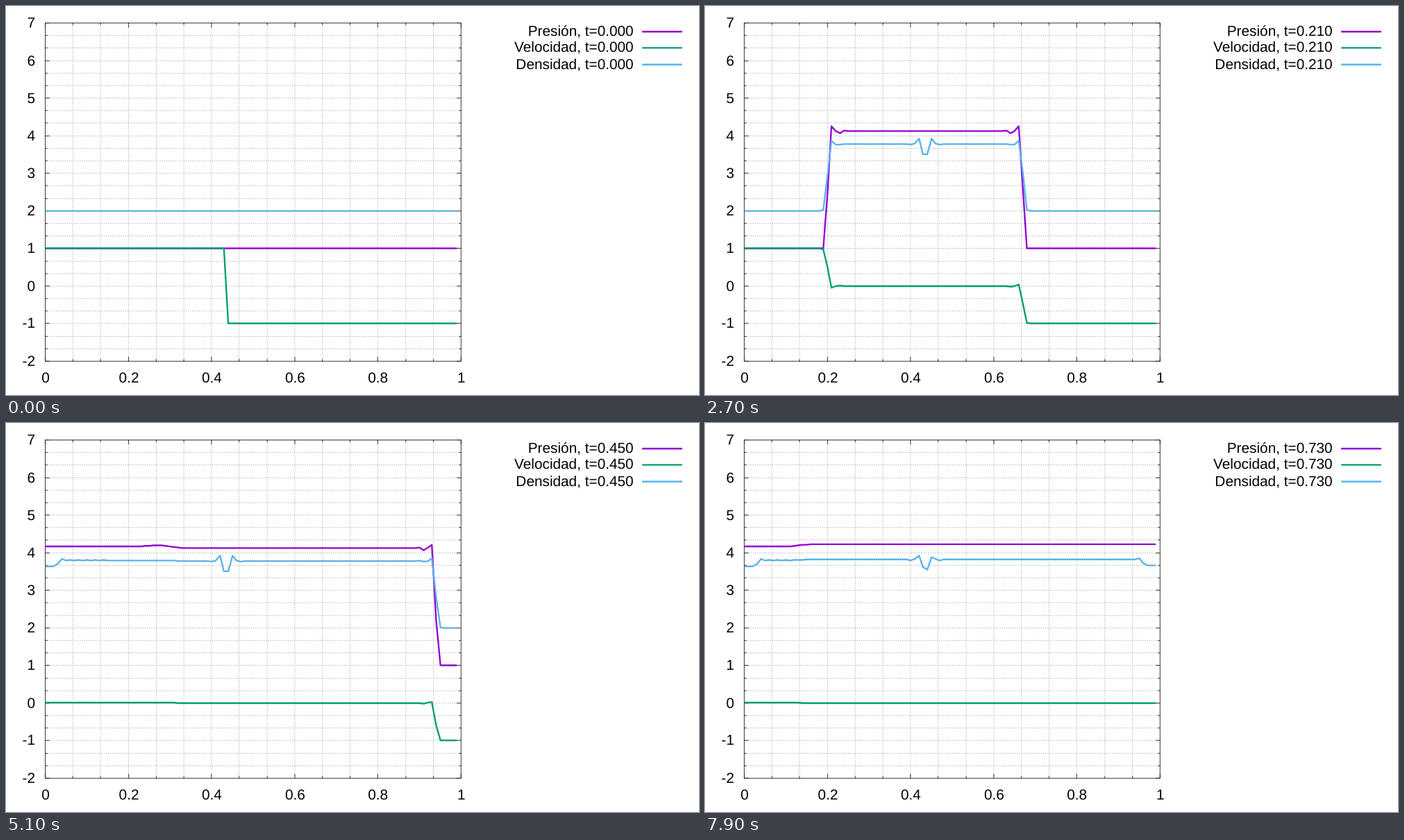
Animation of 998 by 561 pixels, one loop 8000 ms. Source, as an HTML page:

```html
<!DOCTYPE html>
<html lang="es">
<head>
<meta charset="utf-8">
<style>
  html, body { margin: 0; width: 100%; height: 100%; overflow: hidden; background: #fff; }
  svg { display: block; width: 998px; height: 561px; }
  text { font: 26.67px "Liberation Sans", Arial, sans-serif; fill: #000; text-rendering: geometricPrecision; }
  path { fill: none; }
  .grid { stroke: #888; stroke-dasharray: 1.5 2.5; }
  .axes { stroke: #000; }
  .line { stroke-width: 3; stroke-linejoin: round; }
  .end { text-anchor: end; }
  .mid { text-anchor: middle; }
</style>
</head>
<body>
<svg id="plot" viewBox="0 0 1280 720" preserveAspectRatio="none"></svg>
<script>
// Drawn on a 1280 x 720 canvas with points snapped to its pixel centres
const plot = document.getElementById('plot');
const snap = v => Math.floor(v + 1e-6) + 0.5;
const X = x => snap(72.5 + 768 * x);
const Y = y => snap(518.39 - 69.556 * y);
const clamp = v => Math.max(0, Math.min(1, v));

function add(tag, attrs, text = '') {
  const el = document.createElementNS('http://www.w3.org/2000/svg', tag);
  for (const k in attrs) el.setAttribute(k, attrs[k]);
  el.textContent = text;
  return plot.appendChild(el);
}

// Grid, ticks and tick labels
const [L, R, T, B] = [X(0), X(1), Y(7), Y(-2)];
let grid = '', axes = `M${L} ${T}H${R}V${B}H${L}Z`;
for (let i = 0; i <= 15; i++) {
  const x = X(i / 15), len = i % 3 ? 4 : 8;
  if (i % 15) grid += `M${x} ${B}V${T}`;
  axes += `M${x} ${B}v${-len}M${x} ${T}v${len}`;
  if (i % 3 === 0) add('text', { x: x + 0.6, y: 697, class: 'mid' }, String(i / 15));
}
for (let i = 0; i <= 27; i++) {
  const y = Y(i / 3 - 2), len = i % 3 ? 4 : 8;
  if (i % 27) grid += `M${L} ${y}H${R}`;
  axes += `M${L} ${y}h${len}M${R} ${y}h${-len}`;
  if (i % 3 === 0) add('text', { x: 53.9, y: y + 8.6, class: 'end' }, String(i / 3 - 2));
}
add('path', { d: grid, class: 'grid' });
add('path', { d: axes, class: 'axes' });

const series = [['Presión', '#9400d3'], ['Velocidad', '#009e73'], ['Densidad', '#56b4e9']].map(([name, stroke], i) => {
  const y = snap(47.2 + 30.5 * i);
  add('path', { d: `M1175 ${y}H1249`, stroke, class: 'line' });
  return {
    name,
    label: add('text', { x: 1159, y: y + 7.8, class: 'end' }),
    curve: add('path', { stroke, class: 'line' })
  };
});

// Shock profile, by cells behind the front
const KNOTS = [-1.3, -.9, -.3, 0, .15, .7, 1.1, 1.7, 2.1, 2.7, 3.1, 3.7, 4.2, 5.2];
const PRES = [1, 1, 1.8, 2.6, 2.95, 4.15, 4.3, 4.17, 4.1, 4.05, 4.08, 4.14, 4.13, 4.12];
const VEL = [1, .97, .7, .47, .33, 0, -.06, -.03, .01, .01, .01, 0, 0, 0];
const DENS = [2, 2.04, 2.6, 3.02, 3.27, 3.84, 3.87, 3.79, 3.75, 3.77, 3.77, 3.79, 3.78, 3.78];

// Cells next to a wall: lasting density layer and decaying ringing
const LAYER = [-.16, -.16, -.16, -.1, .03];
const RING_P = [-.07, -.07, -.07, .17, -.01, .06];
const RING_V = [.03, .03, .03, -.03, .04];
const RING_D = [0, 0, 0, .11];

function sample(vals, q) {
  const n = KNOTS.findIndex(k => k > q);
  if (n < 0) return vals[vals.length - 1];
  if (n === 0) return vals[0];
  const f = (q - KNOTS[n - 1]) / (KNOTS[n] - KNOTS[n - 1]);
  return vals[n - 1] + f * (vals[n] - vals[n - 1]);
}

// Density dip left at the contact, slowly drifting
function contact(i, t) {
  const m = clamp((t - .48) / .25);
  const dip = [-.02, .01, .15 - .05 * m, -.28 + .08 * m, -.28 + .01 * m, .15 - .09 * m, .01, -.02];
  return (dip[i - 40] || 0) * clamp((t - .005) / .03);
}

function state(i, t) {
  const side = i < 43.5 ? 1 : -1;
  if (t === 0) return [1, side, 2];
  const front = 112 * t - .05;
  const behind = c => front - Math.abs(c - 43.5);
  const q = behind(Math.max(3, Math.min(96, i)));
  let p = sample(PRES, q), v = side * sample(VEL, q), d = sample(DENS, q) + contact(i, t);
  if (q < 1) return [p, v, d];

  // Weak waves sent back by both walls
  const x = i / 100, run = 3.26 * (t - .53);
  const za = t > .354 ? .574 + run - x : -1;
  const zb = t > .47 ? x - .775 + run : -1;
  const a = clamp((za + .02) / .045), b = clamp((zb + .015) / .045);
  const bump = z => .02 * clamp((z + .01) / .03) * clamp((.085 - z) / .03) * clamp((.68 - t) / .15);
  p += .05 * (a + b) + bump(za) + bump(zb);
  v += .012 * (a - b);
  d += .02 * (a + b);
  const rough = side > 0 ? i > 3 && i < 39 && za > .17 && zb < -.02 : i < 95 && zb > .08 && za < 0;
  if (rough) d += i % 2 ? -.008 : .008;

  const k = side > 0 ? i : 99 - i, edge = behind(side > 0 ? 3 : 96);
  if (k < 6 && edge > 1) {
    const ring = Math.min(1, Math.exp((2.1 - edge) / 1.5));
    p += RING_P[k] * ring;
    v += side * (RING_V[k] || 0) * ring;
    d += (LAYER[k] || 0) + (RING_D[k] || 0) * ring;
  }
  return [p, v, d];
}

let shown = -1;
function draw(now) {
  const ms = now % 8000;
  const step = ms < 700 ? 0 : Math.floor((ms - 600) / 100);
  if (step !== shown) {
    shown = step;
    const t = step / 100;
    const cells = Array.from({ length: 100 }, (_, i) => state(i, t));
    series.forEach((s, n) => {
      s.label.textContent = `${s.name}, t=${t.toFixed(3)}`;
      s.curve.setAttribute('d', 'M' + cells.map((c, i) => `${X(i / 100)} ${Y(c[n])}`).join('L'));
    });
  }
  requestAnimationFrame(() => draw(performance.now()));
}
draw(performance.now());
</script>
</body>
</html>
```
